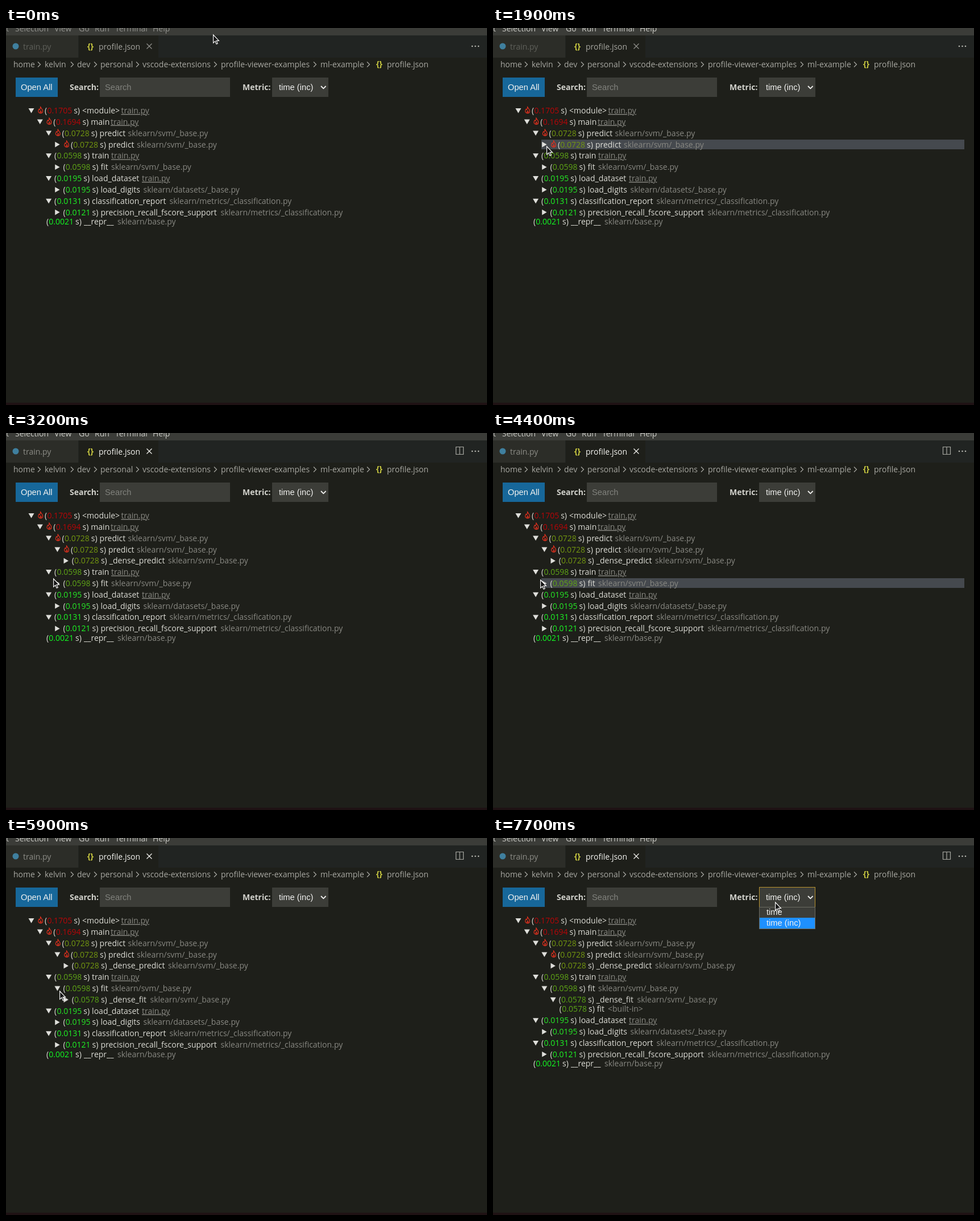
An HTML page for the animation above (8 s loop, 846x662 px).

```html
<!DOCTYPE html>
<html lang="en">
<head>
<meta charset="utf-8">
<title>Profile viewer</title>
<style>
  html, body { margin: 0; width: 100%; height: 100%; overflow: hidden; background: #1e1f1a; }
  #stage { position: absolute; left: 0; top: 0; width: 846px; height: 662px; overflow: hidden; }
  svg { position: absolute; left: 0; top: 0; }
  text { font: 14px "Open Sans", "Noto Sans", sans-serif; fill: #dcdcd5; }
  .ui { font: 14.7px "Liberation Sans", Arial, sans-serif; fill: #f2f2f0; }
  .bold { font-weight: 700; fill: #d2d2cc; }
  .crumb { fill: #a8a8a2; }
  .json { font-weight: 700; fill: #cbcb41; }
  .path { fill: #888882; }
  .link { text-decoration: underline; }
  .line { fill: none; stroke: #a8a8a2; stroke-width: 1.2; }
  .flame { fill: none; stroke: #e0301e; stroke-width: 1.2; stroke-linejoin: round; }

  .a, #hover { animation: 8s step-end infinite; }
  .on21 { animation-name: on21; }
  .on52 { animation-name: on52; }
  .on67 { animation-name: on67; }
  .on77 { animation-name: on77; }
  .off21 { animation-name: off21; }
  .off52 { animation-name: off52; }
  .off67 { animation-name: off67; }
  @keyframes on21 { 0% { opacity: 0 } 26.25%, to { opacity: 1 } }
  @keyframes on52 { 0% { opacity: 0 } 65%, to { opacity: 1 } }
  @keyframes on67 { 0% { opacity: 0 } 83.75%, to { opacity: 1 } }
  @keyframes on77 { 0% { opacity: 0 } 96.25%, to { opacity: 1 } }
  @keyframes off21 { 0% { opacity: 1 } 26.25%, to { opacity: 0 } }
  @keyframes off52 { 0% { opacity: 1 } 65%, to { opacity: 0 } }
  @keyframes off67 { 0% { opacity: 1 } 83.75%, to { opacity: 0 } }

  #menu text { fill: inherit; }
  #menu { animation-name: menu; }
  #tab1 { animation-name: tab1; }
  #tab2 { animation-name: tab2; }
  #close { animation-name: close; stroke-width: 1.3; }
  @keyframes menu { 0% { fill: #92928e } 23.75%, to { fill: #cbcbc6 } }
  @keyframes tab1 { 0% { fill: #5f605a } 26.25%, to { fill: #8c8c86 } }
  @keyframes tab2 { 0% { fill: #a5a59f } 26.25%, to { fill: #f4f4f0 } }
  @keyframes close { 0% { stroke: #8f8f8a } 26.25%, to { stroke: #f0f0ec } }

  #lower { animation-name: lower; }
  #rest { animation-name: rest; }
  @keyframes lower { 0% { transform: none } 26.25%, to { transform: translateY(19.8px) } }
  @keyframes rest {
    0% { transform: none }
    65% { transform: translateY(19.8px) }
    83.75%, to { transform: translateY(36.4px) }
  }

  #hover { position: absolute; right: 17px; height: 17px; background: #45494e; animation-name: hover; }
  @keyframes hover {
    0% { left: 55px; top: 156px; opacity: 0 }
    10% { left: 55px; top: 156px; opacity: 1 }
    11.25% { left: 70px; top: 176px; opacity: 1 }
    12.5% { left: 85px; top: 196px; opacity: 1 }
    30% { left: 85px; top: 196px; opacity: 0 }
    32.5% { left: 71px; top: 235px; opacity: 1 }
    35% { left: 71px; top: 235px; opacity: 0 }
    55% { left: 85px; top: 255px; opacity: 1 }
    73.75% { left: 85px; top: 255px; opacity: 0 }
    76.25% { left: 101px; top: 275px; opacity: 1 }
    87.5% { left: 85px; top: 255px; opacity: 1 }
    88.75% { left: 71px; top: 235px; opacity: 1 }
    90% { left: 70px; top: 176px; opacity: 1 }
    91.25% { left: 55px; top: 156px; opacity: 1 }
    92.5%, to { left: 55px; top: 156px; opacity: 0 }
  }

  #cursor { animation-name: move; }
  @keyframes move {
    0% { transform: translate(364px, 11px) }
    6.25% { transform: translate(343px, 31px) }
    7.5% { transform: translate(285px, 82px) }
    8.75% { transform: translate(219px, 130px) }
    10% { transform: translate(163px, 163px) }
    11.25% { transform: translate(124px, 186px) }
    12.5% { transform: translate(102px, 202px) }
    13.75% { transform: translate(95px, 209px) }
    16.25% { transform: translate(103px, 211px) }
    17.5% { transform: translate(111px, 211px) }
    20% { transform: translate(94px, 207px) }
    30% { transform: translate(92px, 220px) }
    31.25% { transform: translate(90px, 236px) }
    32.5% { transform: translate(88px, 245px) }
    33.75% { transform: translate(86px, 250px) }
    35% { transform: translate(84px, 253px) }
    36.25% { transform: translate(83px, 254px) }
    40% { transform: translate(83px, 255px) }
    41.25% { transform: translate(82px, 256px) }
    42.5% { transform: translate(82px, 257px) }
    55% { transform: translate(83px, 257px) }
    56.25% { transform: translate(90px, 263px) }
    57.5% { transform: translate(94px, 267px) }
    73.75% { transform: translate(94px, 268px) }
    75% { transform: translate(99px, 274px) }
    76.25% { transform: translate(103px, 279px) }
    87.5% { transform: translate(125px, 269px) }
    88.75% { transform: translate(217px, 238px) }
    90% { transform: translate(345px, 187px) }
    91.25% { transform: translate(447px, 158px) }
    92.5%, to { transform: translate(496px, 112px) }
  }
  #arrow { animation-name: arrow; }
  #beam { animation-name: beam; }
  @keyframes arrow { 0% { opacity: 1 } 30% { opacity: 0 } 32.5%, to { opacity: 1 } }
  @keyframes beam { 0% { opacity: 0 } 30% { opacity: 1 } 32.5%, to { opacity: 0 } }
</style>
</head>
<body>
<div id="stage">
  <div id="hover"></div>
  <svg width="846" height="662" viewBox="0 0 846 662">
    <!-- menu and tabs -->
    <rect width="846" height="13" fill="#3b3c38"/>
    <g id="menu" class="a">
      <text x="0" y="6">t</text><text x="16" y="6">Selection</text><text x="85" y="6">View</text>
      <text x="128" y="6">Go</text><text x="156" y="6">Run</text><text x="192" y="6">Terminal</text>
      <text x="258" y="6">Help</text>
    </g>
    <rect y="13" width="846" height="39" fill="#212422"/>
    <rect y="13" width="127" height="39" fill="#2c2d28"/>
    <rect x="128" y="13" width="140" height="39" fill="#1e1f1a"/>
    <circle cx="17" cy="32" r="5.5" fill="#3f7f9e"/>
    <text id="tab1" class="a" x="30" y="38">train.py</text>
    <text class="json" x="143" y="37">{}</text>
    <text id="tab2" class="a" x="163" y="38">profile.json</text>
    <path id="close" class="a" d="M247.5 27.5l9 9m0-9l-9 9"/>
    <path class="line a on21" d="M791.5 24.5h13v13h-13zm6.5 0v13"/>
    <g fill="#b4b4ae"><circle cx="820" cy="32" r="1.3"/><circle cx="825.5" cy="32" r="1.3"/><circle cx="831" cy="32" r="1.3"/></g>

    <g id="crumbs"></g>
    <text class="json" x="651" y="68">{}</text>
    <text class="crumb" x="670" y="69">profile.json</text>

    <!-- toolbar -->
    <rect x="17" y="87" width="74" height="34" fill="#17679a"/>
    <text class="ui" x="26" y="108.5">Open All</text>
    <text class="bold" x="112" y="109">Search:</text>
    <rect x="165" y="87" width="229" height="34" fill="#3c3d38"/>
    <text class="ui" x="174" y="108.5" style="fill:#81827d">Search</text>
    <text class="bold" x="416" y="109">Metric:</text>
    <rect x="468" y="87" width="99" height="34" fill="#3c3d38"/>
    <text class="ui" x="480" y="109">time (inc)</text>
    <path d="M554 102l4.3 4.3 4.3-4.3" fill="none" stroke="#f2f2f0" stroke-width="1.8"/>

    <g id="top"></g>
    <g id="lower" class="a"><g id="fit"></g><g id="rest" class="a"></g></g>

    <g class="a on77">
      <rect x="468.5" y="86.5" width="98" height="35" fill="none" stroke="#b8922f"/>
      <rect x="468.5" y="121.5" width="98" height="38" fill="#3c3d38" stroke="#6b6b62"/>
      <rect x="469" y="140" width="97" height="19" fill="#1e90ff"/>
      <text class="ui" x="481" y="135">time</text>
      <text class="ui" x="481" y="154">time (inc)</text>
    </g>

    <rect y="658" width="846" height="4" fill="#1f1214"/>

    <g id="cursor" class="a">
      <path id="arrow" class="a" d="M.6 1v14.2l3.3-3 2.2 5 2.2-1-2.2-4.8h4.4z" fill="#151515" stroke="#fff" stroke-width="1.1"/>
      <g id="beam" class="a" fill="none">
        <path d="M-2.5-7H3M.2-7V7M-2.5 7H3" stroke="#111" stroke-width="3.4"/>
        <path d="M-2.5-7H3M.2-7V7M-2.5 7H3" stroke="#fff" stroke-width="1.3"/>
      </g>
    </g>
  </svg>
</div>
<script>
  const $ = id => document.getElementById(id);
  const esc = s => s.replace(/</g, '&lt;').replace(/>/g, '&gt;');
  const text = (x, y, s, cls = '', style = '') =>
    `<text x="${x}" y="${y}" class="${cls}" style="${style}">${esc(s)}</text>`;

  // breadcrumb: label, x, x of the chevron after it
  $('crumbs').innerHTML = [
    ['home', 13, 56], ['kelvin', 68, 114], ['dev', 125, 155], ['personal', 166, 229],
    ['vscode-extensions', 240, 366], ['profile-viewer-examples', 378, 541], ['ml-example', 553, 635]
  ].map(([s, x, sep]) => text(x, 69, s, 'crumb') +
    `<path class="line" d="M${sep} 59.5l4.5 4.5-4.5 4.5"/>`).join('');

  const tone = {
    '0.1705': '#b80508', '0.1694': '#b80508', '0.0728': '#739710', '0.0598': '#5fa516',
    '0.0578': '#5ba816', '0.0195': '#25e826', '0.0131': '#1cf524', '0.0121': '#1cf524', '0.0021': '#12fa22'
  };
  const marker = (x, y, open, cls) => {
    const d = open ? `M${x} ${y - 4}h10l-5 8.5z` : `M${x + .8} ${y - 4.7}v9.6l8.4-4.8z`;
    return `<path class="${cls}" fill="#dededa" d="${d}"/>`;
  };
  const flame = (x, y) => `<path class="flame" transform="translate(${x} ${y})"
    d="M4.6-6.4C5-3.5 8.6-2.2 8.6 1.4 8.6 3.8 7 5.2 4.8 5.2S.8 3.6.8 1.4C.8-.4 1.8-1 2.2-2.4L3.4-.8C4.6-2.4 4.8-4 4.6-6.4zM4.8 5C2.6 3.6 4.6 2 4.9.8 6.8 2.4 6.6 4.2 4.8 5z"/>`;

  // y, depth, value, name, path, path x, marker: open, shut, leaf or toggle time; optional reveal class
  function row([y, depth, value, name, path, px, state, reveal]) {
    const left = 39.5 + depth * 15.3;
    const hot = value > 0.07 && name[0] !== '_';
    const x = state === 'leaf' ? left + .8 : left + (hot ? 28.5 : 15);
    let s = '';
    if (state === 'open' || state === 'shut') s += marker(left, y, state === 'open', '');
    else if (state !== 'leaf')
      s += marker(left, y, false, 'a off' + state) + marker(left, y, true, 'a on' + state);
    if (hot) s += flame(left + 16.5, y - .5);
    s += text(x, y + 5, '(') + text(x + 4.4, y + 5, value, '', 'fill:' + tone[value]);
    s += text(x + 51.2, y + 5, 's)') + text(x + 66, y + 5, name);
    s += text(px, y + 5, path, path === 'train.py' ? 'path link' : 'path');
    return `<g class="${reveal ? 'a ' + reveal : ''}">${s}</g>`;
  }
  const fill = (id, rows) => { $(id).innerHTML = rows.map(row).join(''); };

  const svm = 'sklearn/svm/_base.py', report = 'sklearn/metrics/_classification.py';
  fill('top', [
    [145, 0, '0.1705', '<module>', 'train.py', 202.5, 'open'],
    [164.5, 1, '0.1694', 'main', 'train.py', 184, 'open'],
    [184.5, 2, '0.0728', 'predict', svm, 214.5, 'open'],
    [204.5, 3, '0.0728', 'predict', svm, 230, '21'],
    [224.3, 4, '0.0728', '_dense_predict', svm, 285, 'shut', 'on21']
  ]);
  fill('fit', [
    [224.3, 2, '0.0598', 'train', 'train.py', 185, 'open'],
    [244.2, 3, '0.0598', 'fit', svm, 185, '52'],
    [264, 4, '0.0578', '_dense_fit', svm, 253.5, '67', 'on52'],
    [280.6, 5, '0.0578', 'fit', '<built-in>', 202, 'leaf', 'on67']
  ]);
  fill('rest', [
    [264, 2, '0.0195', 'load_dataset', 'train.py', 239, 'open'],
    [283.9, 3, '0.0195', 'load_digits', 'sklearn/datasets/_base.py', 241.5, 'shut'],
    [303.7, 2, '0.0131', 'classification_report', report, 287.5, 'open'],
    [323.5, 3, '0.0121', 'precision_recall_fscore_support', report, 377.5, 'shut'],
    [340, 2, '0.0021', '__repr__', 'sklearn/base.py', 196, 'leaf']
  ]);
</script>
</body>
</html>
```
